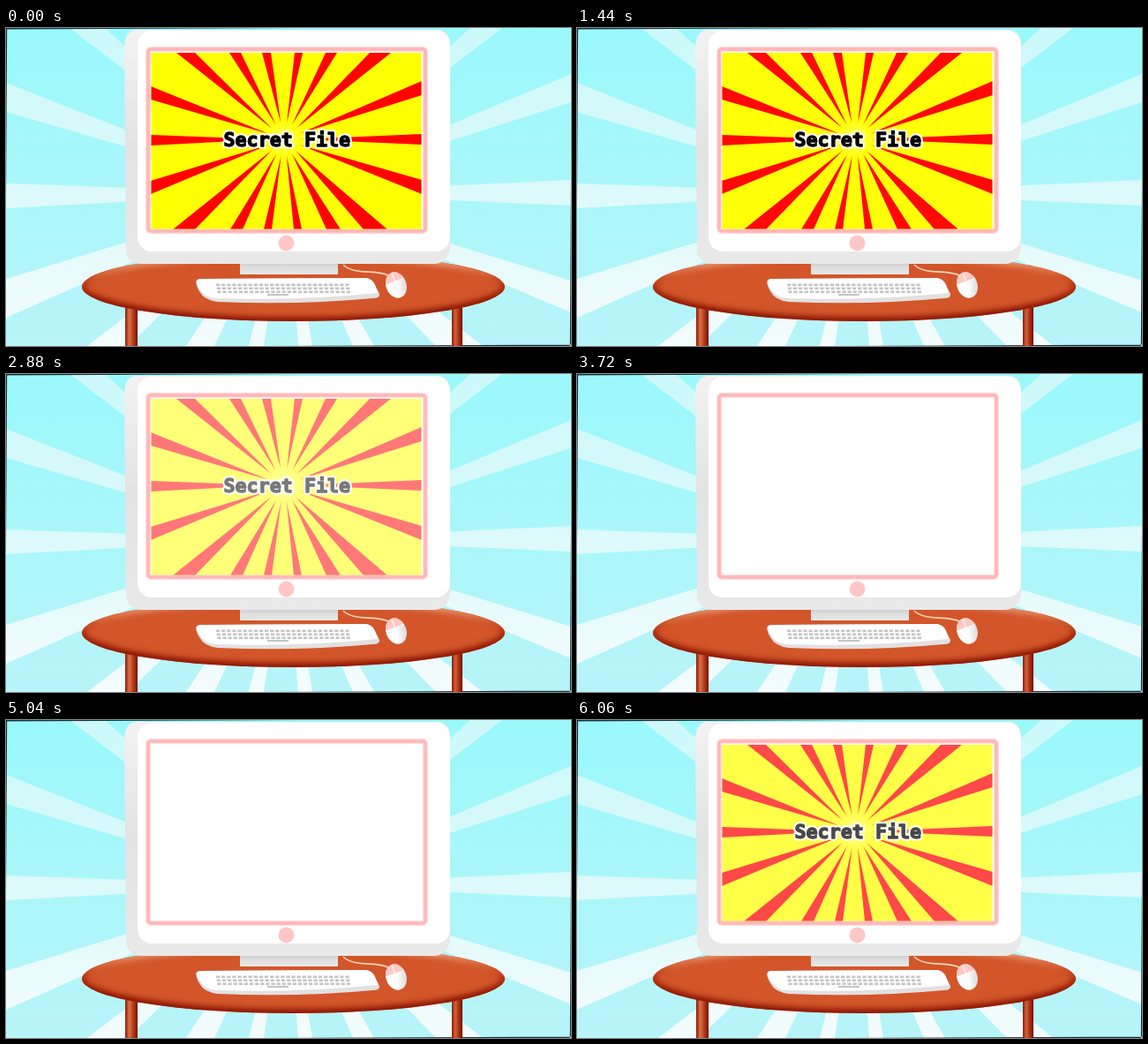
Animation of 640 by 360 pixels, one loop 6120 ms. Source, as an HTML page with a canvas:

```html
<!DOCTYPE html>
<html lang="en">
<head>
<meta charset="utf-8">
<title>Secret File</title>
<style>
html, body { margin: 0; width: 100%; height: 100%; overflow: hidden; background: #acf6f9; }
canvas { display: block; width: 640px; height: 360px; }
</style>
</head>
<body>
<canvas id="stage" width="640" height="360"></canvas>
<script>
const LOOP = 6120, STEP = 60, PULSE = LOOP / 9, PEAK = 36;
const view = document.getElementById('stage').getContext('2d');

function layer(draw) {
  const c = document.createElement('canvas');
  c.width = 640;
  c.height = 360;
  draw(c.getContext('2d'));
  return c;
}

function shade(g, x0, y0, x1, y1, ...colors) {
  const s = g.createLinearGradient(x0, y0, x1, y1);
  colors.forEach((c, i) => s.addColorStop(i / (colors.length - 1), c));
  return s;
}

function fillPath(g, d, color) {
  g.fillStyle = color;
  g.fill(new Path2D(d));
}

function box(g, x, y, w, h, r, color) {
  g.beginPath();
  g.roundRect(x, y, w, h, r);
  g.fillStyle = color;
  g.fill();
}

// Wedge widening from a point near the centre to the edge segment a-b.
function ray(g, cx, cy, gap, ax, ay, bx, by) {
  const dx = (ax + bx) / 2 - cx, dy = (ay + by) / 2 - cy, k = gap / Math.hypot(dx, dy);
  g.beginPath();
  g.moveTo(cx + dx * k, cy + dy * k);
  g.lineTo(ax, ay);
  g.lineTo(bx, by);
  g.fill();
}

function drawBackdrop(g) {
  g.fillStyle = shade(g, 0, 0, 0, 360, '#9af8fb', '#aaf7fa', '#b8f4f9');
  g.fillRect(0, 0, 640, 360);
  g.fillStyle = shade(g, 0, 0, 0, 360, '#ccf9fb', '#dcf9fb', '#f4fcfd');
  const toX = x => ([a, b]) => ray(g, 318, 187, 0, x, a, x, b);
  const toY = y => ([a, b]) => ray(g, 318, 187, 0, a, y, b, y);
  [[62, 95], [176, 204], [284, 328]].forEach(toX(0));
  [[52, 84], [172, 201], [286, 322]].forEach(toX(640));
  [[92, 138], [204, 236], [275, 292], [331, 347], [393, 417], [487, 540]].forEach(toY(360));
  [[72, 112], [526, 562]].forEach(toY(0));
  fillPath(g, 'M0 0H330L0 1.6ZM0 0H1.2L0 200ZM640 360H300L640 358.4ZM640 360V170L638.8 360Z', '#16323c');
}

function drawTable(g) {
  box(g, 135, 312, 14, 50, 0, shade(g, 135, 0, 149, 0, '#8a1a06', '#dc7048', '#b03a18', '#7a1002'));
  box(g, 505, 312, 12, 50, 0, shade(g, 505, 0, 517, 0, '#8a1a06', '#d4623a', '#a83012', '#760f02'));
  const top = new Path2D();
  top.ellipse(325.5, 293, 239.5, 39, 0, 0, 7);
  g.save();
  g.clip(top);
  g.fillStyle = '#d2562a';
  g.fillRect(80, 250, 490, 90);
  g.filter = 'blur(3px)';
  g.lineWidth = 9;
  g.strokeStyle = shade(g, 0, 262, 0, 322, '#eea482', '#d8673c', '#b02c0c', '#8c1400', '#840f00');
  g.stroke(top);
  g.restore();
}

function drawMonitor(g) {
  box(g, 265, 262, 111, 17, 1, shade(g, 0, 264, 0, 279, '#c9c9c9', '#dddddd', '#e9e9e9'));
  fillPath(g, 'M146 2H490Q503 4 503 20V250Q500 266 486 267H152Q137 265 136 252L134 22Q134 5 146 2Z',
    shade(g, 0, 2, 0, 267, '#f2f2f2', '#e3e3e3', '#e9e9e9'));
  box(g, 149, 3, 354, 250, 16, '#ffffff');
  g.lineWidth = 6;
  g.strokeStyle = '#ffdcdc';
  g.beginPath();
  g.roundRect(161, 24, 314, 206, 3);
  g.stroke();
  g.lineWidth = 3.5;
  g.strokeStyle = '#ffb6b6';
  g.stroke();
  g.fillStyle = '#ffc6c6';
  g.beginPath();
  g.arc(317.5, 243.5, 9, 0, 7);
  g.fill();
}

function drawDesk(g) {
  fillPath(g, 'M220 284L408 283Q415 284 418 291L423 301Q424 306 415 306Q330 314 240 310Q224 308 219 298Q211 284 220 284Z', '#e2e0e0');
  fillPath(g, 'M220 284L408 283Q415 284 418 291L421 300Q330 309 238 306Q225 305 219 295Q213 285 220 284Z', '#ffffff');
  g.fillStyle = '#c4c4c4';
  for (let row = 0; row < 3; row++) {
    for (let i = 0; i < 25; i++) {
      g.fillRect(238 + row * .7 + i * 6.1, 289.5 + row * 4, 4.2, 2.6);
    }
  }
  g.fillRect(296, 301, 24, 2);

  g.strokeStyle = '#f6d3b8';
  g.lineWidth = 1.6;
  g.stroke(new Path2D('M382 268C394 280 420 273 433 280'));
  g.save();
  g.translate(442, 291);
  g.rotate(-.35);
  g.beginPath();
  g.ellipse(0, 0, 11.5, 15, 0, 0, 7);
  g.fillStyle = shade(g, -11, 0, 12, 6, '#ffffff', '#fcfcfc', '#d9d3d3');
  g.fill();
  g.clip();
  g.fillStyle = '#ffc9c3';
  g.fillRect(-12, -16, 24, 12);
  g.strokeStyle = '#fff';
  g.lineWidth = 1;
  g.stroke(new Path2D('M0 -16V-4H-12H12'));
  g.restore();
}

function drawPicture(g) {
  g.beginPath();
  g.rect(164.5, 28, 306, 199.5);
  g.clip();
  g.fillStyle = '#ffff00';
  g.fillRect(160, 20, 320, 220);
  g.fillStyle = '#ff0000';
  const cx = 315, cy = 126;
  const toX = x => ([a, b]) => ray(g, cx, cy, 18, x, a, x, b);
  const toY = y => ([a, b]) => ray(g, cx, cy, 18, a, y, b, y);
  [[193, 214], [253, 266], [290, 300], [327, 336], [362, 375], [412, 436]].forEach(toY(28));
  [[189, 214], [254, 268], [292, 301], [326, 335], [363, 379], [405, 432]].forEach(toY(228));
  [[66, 81], [121, 133], [173, 188]].forEach(toX(164));
  [[60, 76], [120, 132], [172, 188]].forEach(toX(471));
  const glow = g.createRadialGradient(cx, cy, 5, cx, cy, 26);
  glow.addColorStop(0, '#ffff70');
  glow.addColorStop(.4, '#ffff30d0');
  glow.addColorStop(1, '#ffff0000');
  g.fillStyle = glow;
  g.fillRect(cx - 32, cy - 32, 64, 64);

  g.font = 'bold 21.7px "DejaVu Sans Mono", "Liberation Mono", monospace';
  g.lineJoin = 'round';
  g.strokeStyle = '#fff';
  g.lineWidth = 5.5;
  g.strokeText('Secret File', 246.5, 133.5);
  g.fillStyle = g.strokeStyle = '#000';
  g.lineWidth = 1.3;
  g.fillText('Secret File', 246.5, 133.5);
  g.strokeText('Secret File', 246.5, 133.5);
}

function smooth(a, b, x) {
  const k = Math.min(1, Math.max(0, (x - a) / (b - a)));
  return k * k * (3 - 2 * k);
}

// The picture flashes up once per pulse and fades back to white.
function strength(t) {
  const p = (t - PEAK + PULSE) % PULSE;
  const d = Math.min(p, PULSE - p);
  return 1 - smooth(20, 235, d);
}

const scene = layer(g => {
  drawBackdrop(g);
  drawTable(g);
  drawMonitor(g);
  drawDesk(g);
});
const picture = layer(drawPicture);
const start = performance.now();

function tick() {
  const t = Math.floor((performance.now() - start) % LOOP / STEP) * STEP;
  view.globalAlpha = 1;
  view.drawImage(scene, 0, 0);
  view.globalAlpha = strength(t);
  view.drawImage(picture, 0, 0);
  requestAnimationFrame(tick);
}
tick();
</script>
</body>
</html>
```
